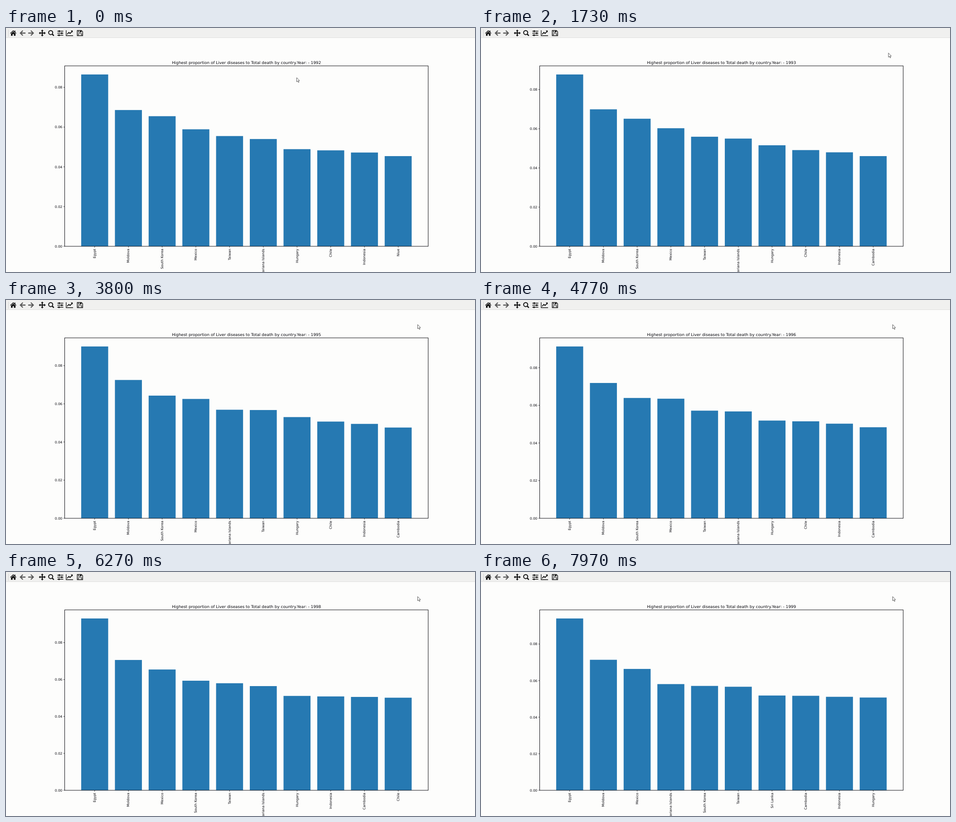
Recreate the animation shown at these times as an HTML page with a canvas. Size 1035 px wide and 541 px high, loop 8 s.

```html
<!DOCTYPE html>
<html lang="en">
<head>
<meta charset="utf-8">
<title>Bar chart by year</title>
<style>
html, body { margin: 0; width: 100%; height: 100%; overflow: hidden; background: #fdfdfc; }
canvas { display: block; width: 100%; height: 100%; }
</style>
</head>
<body>
<canvas id="stage" width="1035" height="541"></canvas>
<script>
const ctx = document.getElementById('stage').getContext('2d', { alpha: false });
ctx.textRendering = 'geometricPrecision';

const LOOP = 8000, FIRST_CHANGE = 1065, YEAR_LENGTH = 1036, FIRST_YEAR = 1992;
const BARS = 10;
const AXES = { left: 129.5, right: 931.7, top: 84, bottom: 484 };
const WIDTH = AXES.right - AXES.left, HEIGHT = AXES.bottom - AXES.top;
const PITCH = WIDTH / 10.78;
const INK = '#08080e';

// Turning points of each trend: [years since the first, percent]. Values between are linear.
const TRENDS = {
  'Egypt': [[0, 8.65], [4, 9.125], [7, 9.4]],
  'Moldova': [[0, 6.86], [3, 7.25], [6, 7.06], [7, 7.14]],
  'South Korea': [[0, 6.55], [4, 6.39], [7, 5.71]],
  'Mexico': [[0, 5.89], [2, 6.16], [7, 6.64]],
  'Taiwan': [[0, 5.55], [6, 5.8], [7, 5.665]],
  'Northern Mariana Islands': [[0, 5.4], [3, 5.69], [6, 5.645], [7, 5.81]],
  'Hungary': [[0, 4.89], [2, 5.42], [4, 5.19], [7, 5.075]],
  'Chile': [[0, 4.83], [4, 5.15], [7, 4.95]],
  'Indonesia': [[0, 4.72], [4, 5.025], [7, 5.115]],
  'Niue': [[0, 4.54], [7, 4.5]],
  'Cambodia': [[0, 4.525], [4, 4.835], [7, 5.17]],
  'Sri Lanka': [[0, 4.4], [2, 4.69], [6, 4.9], [7, 5.185]]
};

// Pointer stops: [time, x, y].
const POINTER = [
  [0, 641.5, 110], [250, 641.5, 110], [850, 563.5, 117], [1250, 563.5, 117],
  [1700, 898.5, 55.5], [1900, 908.5, 54.5], [LOOP, 908.5, 54.5]
];

const icon = {
  home: new Path2D('M9 11.4 16 5 18.7 7.5V5.7H20.6V9.2L23 11.4 22.1 12.4 16 7 9.9 12.4ZM11 12.4 16 8 21 12.4V17.2H17.4V13.4H14.6V17.2H11Z'),
  arrow: new Path2D('M30 11.2 36.4 4.9 38 6.5 34.6 9.9H43V12.5H34.6L38 15.9 36.4 17.5Z'),
  move: new Path2D('M80 3.6 83 6.8H81.1V10.1H84.4V8.2L87.6 11.2 84.4 14.2V12.3H81.1V15.6H83L80 18.8 77 15.6H78.9V12.3H75.6V14.2L72.4 11.2 75.6 8.2V10.1H78.9V6.8H77Z'),
  handle: new Path2D('M101.8 13.4 105.6 17.2'),
  sliders: new Path2D('M113.2 7H126.5M113.2 11.5H126.5M113.2 16H126.5'),
  knobs: new Path2D('M116 5.2H119V8.8H116ZM121.5 9.7H124.5V13.3H121.5ZM115.5 14.2H118.5V17.8H115.5Z'),
  chartAxes: new Path2D('M132.8 5V17H148'),
  chartLine: new Path2D('M135 13.8 138.8 9.8 141.3 12.2 145.5 7.8'),
  chartTip: new Path2D('M142.8 5.6H147.2V10Z'),
  save: new Path2D('M157.3 5.5H166.5L169.2 8.2V17H157.3Z'),
  saveParts: new Path2D('M160 6V9.3H165.8V6M159.7 16.7V12.5H166.8V16.7'),
  saveTab: new Path2D('M163.4 5.8H165.8V9H163.4Z'),
  pointer: new Path2D('M0 0V9.3L2.1 7.4 3.7 10.8 5.2 10.1 3.6 6.8H6.4Z')
};

const linear = u => u;
const smooth = u => u * u * (3 - 2 * u);

// Interpolates rows of [position, ...values] and returns the values.
function along(points, position, ease = linear) {
  const next = Math.max(1, points.findIndex(p => p[0] >= position));
  const [a, ...from] = points[next - 1], [b, ...to] = points[next];
  const u = ease((position - a) / (b - a));
  return from.map((v, i) => v + (to[i] - v) * u);
}

function chartFor(year) {
  const bars = Object.entries(TRENDS)
    .map(([name, points]) => ({ name, value: along(points, year)[0] / 100 }))
    .sort((a, b) => b.value - a.value)
    .slice(0, BARS);
  return { year, bars, scale: HEIGHT / (bars[0].value * 1.05) };
}

const charts = Array.from({ length: 8 }, (_, year) => chartFor(year));
const barCenter = i => AXES.left + (0.89 + i) * PITCH;

function text(string, x, y, size, align, family = '"DejaVu Sans", sans-serif') {
  ctx.font = `${size}px ${family}`;
  ctx.textAlign = align;
  ctx.fillStyle = INK;
  ctx.fillText(string, x, y);
}

function fill(path, color = '#111') {
  ctx.fillStyle = color;
  ctx.fill(path);
}

function stroke(path, width, color = '#111') {
  ctx.lineWidth = width;
  ctx.strokeStyle = color;
  ctx.stroke(path);
}

function rect(x, y, w, h, color) {
  ctx.fillStyle = color;
  ctx.fillRect(x, y, w, h);
}

function drawToolbar() {
  rect(0, 0, 1035, 21, '#f0f0ef');
  rect(0, 21, 1035, 1, '#dededd');
  for (let y = 4; y < 19; y += 2) rect(5, y, 1, 1, '#b8b8b8');

  fill(icon.home);
  fill(icon.arrow, '#5a5a5a');
  ctx.save();
  ctx.translate(92, 0);
  ctx.scale(-1, 1);
  fill(icon.arrow, '#5a5a5a');
  ctx.restore();
  fill(icon.move);

  const lens = new Path2D();
  lens.arc(98.6, 10.2, 4.5, 0, 7);
  stroke(lens, 2);
  stroke(icon.handle, 2.6);

  stroke(icon.sliders, 1.4);
  fill(icon.knobs);
  stroke(icon.chartAxes, 1.3);
  stroke(icon.chartLine, 1.9);
  fill(icon.chartTip);
  stroke(icon.save, 1.4);
  stroke(icon.saveParts, 1.2);
  fill(icon.saveTab);
}

function drawChart({ year, bars, scale }) {
  const ticks = new Path2D();

  bars.forEach(({ name, value }, i) => {
    const x = barCenter(i), h = value * scale;
    rect(x - 0.4 * PITCH, AXES.bottom - h, 0.8 * PITCH, h, '#2679b2');
    ticks.moveTo(x, AXES.bottom);
    ticks.lineTo(x, AXES.bottom + 2.8);
    ctx.save();
    ctx.translate(x + 2.3, AXES.bottom + 5.5);
    ctx.rotate(-Math.PI / 2);
    text(name, 0, 0, 7.42, 'right');
    ctx.restore();
  });

  for (let step = 0; step <= 4; step++) {
    const value = step * 0.02, y = AXES.bottom - value * scale;
    ticks.moveTo(AXES.left, y);
    ticks.lineTo(AXES.left - 2.8, y);
    text(value.toFixed(2), AXES.left - 5.2, y + 2.7, 7.42, 'right');
  }
  stroke(ticks, 0.8, INK);

  ctx.lineWidth = 1;
  ctx.strokeRect(AXES.left, AXES.top, WIDTH, HEIGHT);
  text(`Highest proportion of Liver diseases to Total death by country.Year: - ${FIRST_YEAR + year}`,
    AXES.left + WIDTH / 2, 79.5, 8.9, 'center');
}

function drawPointer(t, { bars, scale }) {
  const [x, y] = along(POINTER, t, smooth);
  const hasMoved = t > POINTER[1][0];
  if (hasMoved && y > AXES.top) {
    const nearest = bars[Math.min(BARS - 1, Math.round((x - barCenter(0)) / PITCH))];
    const value = (AXES.bottom - y) / scale;
    text(`x=${nearest.name} y=${value.toFixed(4)}`, 1034, 13.6, 6.6, 'right', '"Noto Sans", sans-serif');
  }
  ctx.save();
  ctx.translate(x, y);
  fill(icon.pointer, '#fff');
  stroke(icon.pointer, 0.8, '#333');
  ctx.restore();
}

function draw() {
  const t = performance.now() % LOOP;
  const chart = charts[Math.max(0, Math.floor((t - FIRST_CHANGE) / YEAR_LENGTH) + 1)];
  rect(0, 0, 1035, 541, '#fdfdfc');
  drawToolbar();
  drawChart(chart);
  drawPointer(t, chart);
  requestAnimationFrame(draw);
}
draw();
</script>
</body>
</html>
```
